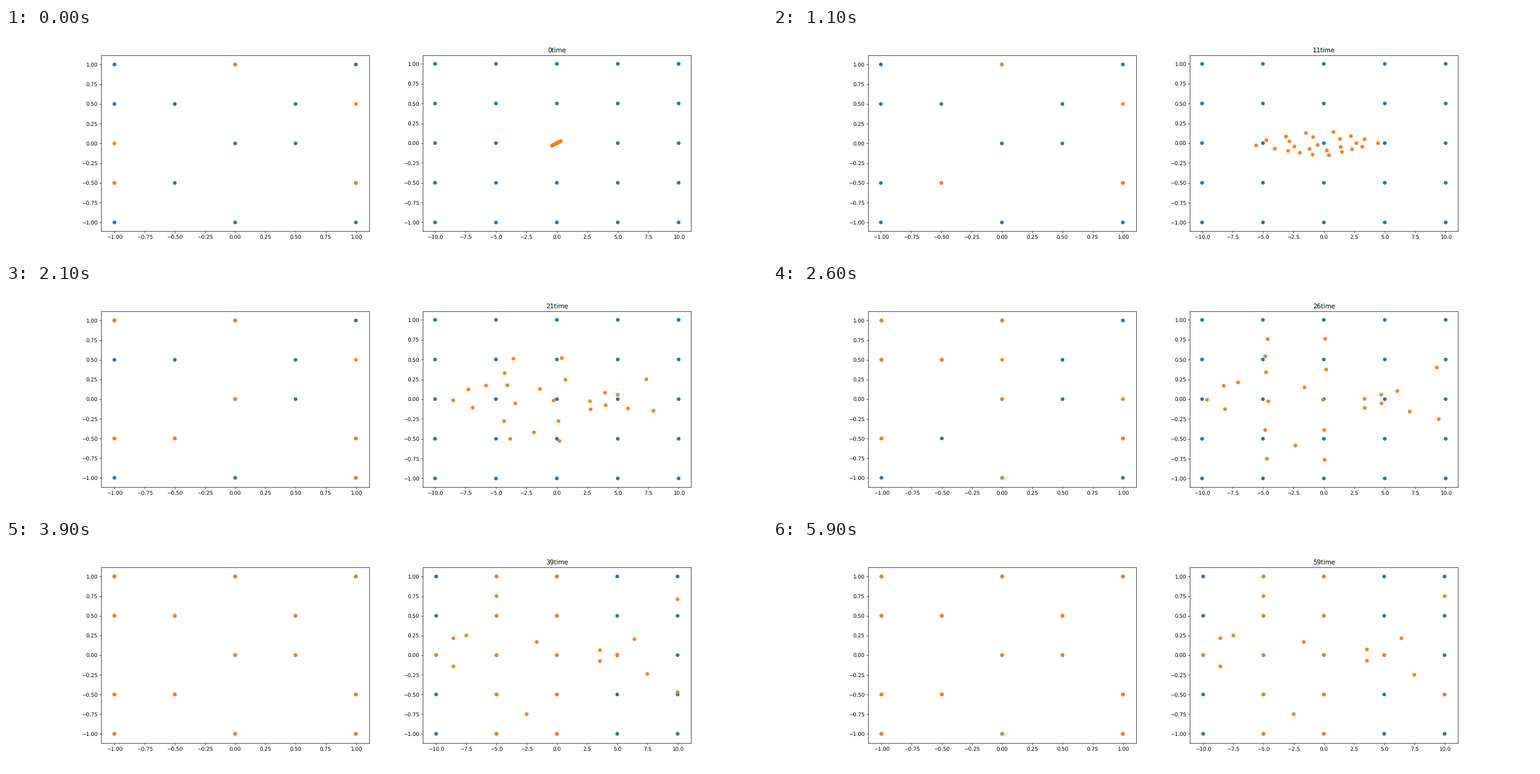
A matplotlib script that plays this animation: 1280 by 384 pixels, repeating every 6000 ms.

```python
import numpy as np
import matplotlib.pyplot as plt
from matplotlib.animation import FuncAnimation

STEPS = 60
BLUE, ORANGE = "C0", "C1"
plt.rcParams["text.hinting"] = "none"

# Left panel: goals in the order they are found, and short stays on the way.
GOALS = np.array([(0, 1), (1, -.5), (-1, 1), (0, 0), (-1, -.5), (-1, .5), (0, -1),
                  (-.5, .5), (.5, 0), (.5, .5), (-1, -1), (-.5, -.5), (1, 1), (1, -1)])
STAYS = [((-1, 0), 0, 5), ((-1, -.5), 0, 5), ((1, .5), 0, 22), ((-.5, -.5), 5, 23),
         ((-.5, 1), 12, 18), ((1, -1), 12, 24), ((0, .5), 22, 30), ((1, 0), 22, 30)]

# Right panel: a regular grid and the places where the nodes come to rest.
LEVELS = np.linspace(-1, 1, 5)
GRID = np.array([(10 * x, y) for x in LEVELS for y in LEVELS])
LOOSE = [(-10, 0), (-60 / 7, 1.5 / 7), (-60 / 7, -1 / 7), (-7.5, .25), (-5, .75),
         (-2.5, -.75), (-5 / 3, 1 / 6), (25 / 7, .5 / 7), (25 / 7, -.5 / 7),
         (5, 0), (5, 0), (45 / 7, 1.5 / 7), (7.5, -.25), (10, .75), (10, -.5)]


def ring(count, size):
    """Points around a lozenge, denser to the lower left and right."""
    phi = np.radians(160) - 2 * np.pi * np.arange(count) / count
    theta = phi - np.radians(13 + 17 * np.cos(phi))
    c, s = np.cos(theta), np.sin(theta)
    r = size * (1.1 - .15 * c) / (abs(c) + abs(s))
    return np.column_stack([5.9 * r * c, .2 * r * s])


def rest_places():
    columns = [(x, y) for x in (-5, 0) for y in LEVELS]
    return np.array(sorted(columns + LOOSE))


def lozenge(rest):
    """Ring points, each placed in the row of the rest place nearest in order."""
    nodes = np.vstack([ring(16, 1), ring(8, .6), [(-.6, -.03)]])
    nodes = nodes[np.argsort(nodes[:, 0])]
    for x in np.unique(rest[:, 0]):
        same = rest[:, 0] == x
        group = nodes[same]
        nodes[same] = group[np.argsort(group[:, 1])]
    return nodes


REST = rest_places()
CLOUD = lozenge(REST)
SETTLE_Y = np.where(REST[:, 0] > 0, 27, 18)


def progress(step, duration, power):
    return 1 - (1 - np.clip((step - 15) / duration, 0, 1)) ** power


def nodes_at(step):
    grow = min(step / 15, 1)
    x = CLOUD[:, 0] * (.062 + .938 * grow ** .6)
    y = CLOUD[:, 1] * grow ** .87 + .005 * CLOUD[:, 0] * (1 - grow)
    x += (REST[:, 0] - x) * progress(step, 15, 1.6)
    y += (REST[:, 1] - y) * progress(step, SETTLE_Y, 1.3)
    return np.column_stack([x, y])


def visited_at(step):
    found = [g for k, g in enumerate(GOALS) if k < 2 or step >= 15 + 2.1 * (k - 2)]
    return np.array(found + [p for p, start, end in STAYS if start <= step < end])


def limits(fixed, moving, radius):
    """Data range padded by the dot radius, plus a 5% margin."""
    lo, hi = fixed.min() - radius, fixed.max() + radius
    pad = radius * 1.1 * (hi - lo)
    lo, hi = min(lo, moving.min() - pad), max(hi, moving.max() + pad)
    margin = .05 * (hi - lo)
    return lo - margin, hi + margin


def refresh(ax, dots, fixed, moving):
    dots.set_offsets(moving)
    box = ax.get_position()
    ax.set_xlim(limits(fixed[:, 0], moving[:, 0], 3 / (2000 * box.width)))
    ax.set_ylim(limits(fixed[:, 1], moving[:, 1], 3 / (600 * box.height)))


def scatter(ax, points, color):
    # One colour per dot keeps the dots from being rounded to whole pixels.
    return ax.scatter(*points.T, c=[color] * len(points))


fig, (left, right) = plt.subplots(1, 2, figsize=(20, 6), dpi=64)
scatter(left, GOALS, BLUE)
scatter(right, GRID, BLUE)
visited = scatter(left, visited_at(0), ORANGE)
nodes = scatter(right, nodes_at(0), ORANGE)
title = right.set_title("0time")


def update(step):
    refresh(left, visited, GOALS, visited_at(step))
    refresh(right, nodes, GRID, nodes_at(step))
    title.set_text(f"{step}time")
    return visited, nodes, title


anim = FuncAnimation(fig, update, frames=STEPS, interval=100,
                     init_func=lambda: update(0), repeat=True, repeat_delay=0)
plt.show()
```
